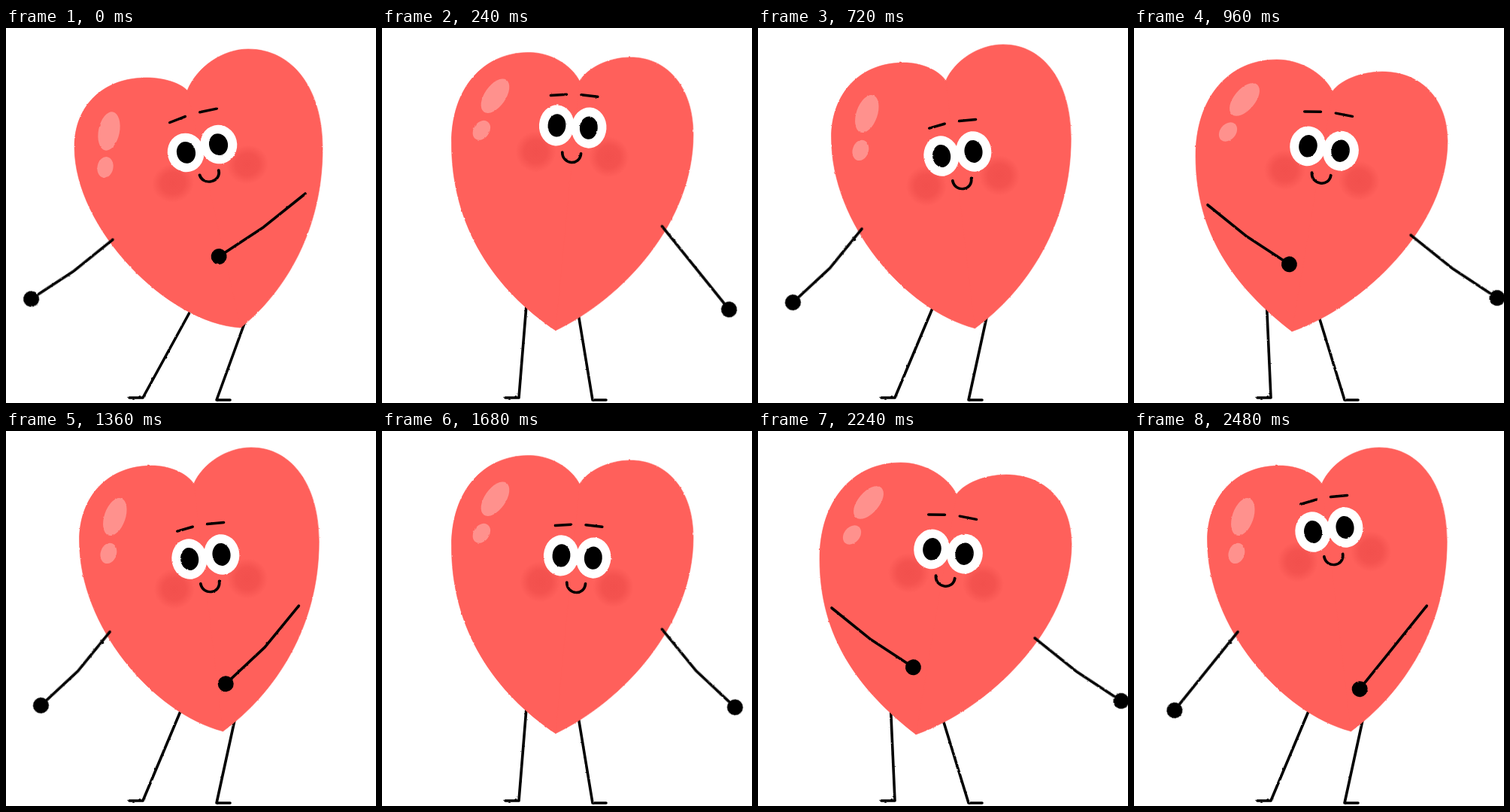
An HTML page that plays this animation: 492 by 498 pixels, repeating every 2560 ms.

```html
<!DOCTYPE html>
<html lang="en">
<head>
<meta charset="utf-8">
<title>Dancing heart</title>
<style>
  html, body { margin: 0; width: 100%; height: 100%; overflow: hidden; background: #fff; }
  svg { display: block; width: 100vw; height: 100vh; }
  .line { fill: none; stroke: #000; stroke-width: 3.6; stroke-linecap: round; stroke-linejoin: round; }
</style>
</head>
<body>
<svg viewBox="0 0 492 498">
  <defs>
    <radialGradient id="blush">
      <stop offset="0" stop-color="#f2504d"/>
      <stop offset=".55" stop-color="#f2504d" stop-opacity=".85"/>
      <stop offset="1" stop-color="#f2504d" stop-opacity="0"/>
    </radialGradient>
    <filter id="brush" filterUnits="userSpaceOnUse" x="0" y="0" width="492" height="498" color-interpolation-filters="sRGB">
      <feTurbulence type="fractalNoise" baseFrequency=".25" numOctaves="1" seed="4"/>
      <feDisplacementMap in="SourceGraphic" scale="2.2" xChannelSelector="R" yChannelSelector="G"/>
    </filter>
  </defs>
  <g id="stage" filter="url(#brush)"></g>
</svg>
<script>
const STEP = 80, SWAY = 8, CYCLE = 16;
const RED = '#ff605b', SHINE = '#ff918d';
const stage = document.getElementById('stage');

// Three key poses; every other pose is a blend of two of them
const upright = {
  notch: [261, 53], tip: [258, 400],
  left: { top: [203, 20], side: [106, 130], handle: [170, 351], shoulder: [133, 248] },
  right: { top: [331, 14], side: [410, 130], handle: [340, 345], shoulder: [378, 248] },
  bigShine: [155, 84], smallShine: [142, 133]
};
const leanLeft = {
  notch: [241, 83], tip: [312, 398],
  left: { top: [187, 66], side: [91, 158], handle: [214, 392], shoulder: [142, 281] },
  right: { top: [322, 28], side: [421, 160], handle: [372, 350], shoulder: [398, 220] },
  bigShine: [137, 137], smallShine: [132, 185]
};
const leanRight = {
  notch: [264, 84], tip: [210, 403],
  left: { top: [190, 42], side: [82, 170], handle: [135, 345], shoulder: [98, 235] },
  right: { top: [330, 58], side: [417, 150], handle: [305, 370], shoulder: [368, 275] },
  bigShine: [147, 95], smallShine: [125, 138]
};

function blend(a, b, t) {
  if (typeof a === 'number') return a + (b - a) * t;
  if (Array.isArray(a)) return a.map((v, i) => blend(v, b[i], t));
  return Object.fromEntries(Object.keys(a).map(k => [k, blend(a[k], b[k], t)]));
}

const line = pts => `<polyline class="line" points="${pts}"/>`;
const ellipse = (x, y, rx, ry, fill, turn = 0) =>
  `<ellipse cx="${x}" cy="${y}" rx="${rx}" ry="${ry}" fill="${fill}" transform="rotate(${turn} ${x} ${y})"/>`;

// Half of the heart, from the notch over the lobe and down to the tip
function half([nx, ny], [tipX, tipY], { top: [topX, topY], side: [sideX, sideY], handle }) {
  const dx = topX - nx, dy = topY - ny, k = 0.4;
  return `M${nx},${ny}` +
    `C${nx + .16 * dx},${ny + .57 * dy} ${topX - .42 * dx},${topY} ${topX},${topY}` +
    `C${sideX + (topX - sideX) * k},${topY} ${sideX},${topY + (sideY - topY) * k} ${sideX},${sideY}` +
    `C${sideX},${sideY + (tipY - sideY) * .45} ${handle} ${tipX},${tipY}L${nx},${ny}Z`;
}

const heart = ({ notch, tip, left, right }) =>
  `<path d="${half(notch, tip, left) + half(notch, tip, right)}" fill="${RED}" stroke="${RED}" stroke-width=".6"/>`;

const legs = (tipX, lean) =>
  line([164, 491, 182, 491, tipX - 46 + 1.3 * lean, 368]) +
  line([298, 494, 280, 494, tipX + 24 + 1.2 * lean, 382]);

const shines = (pose, lean) =>
  ellipse(...pose.bigShine, 14, 26, SHINE, 28 + 1.3 * lean) +
  ellipse(...pose.smallShine, 10.5, 14, SHINE, 28 + 1.3 * lean);

// A hanging arm swung about the shoulder; the elbow trails behind
function arm([x, y], length, th) {
  const swing = 56 * Math.cos(th) - 2 * Math.cos(3 * th) + 3 * Math.sin(th);
  const bend = 3.3 * (Math.cos(th) + Math.sin(th));
  return `<g transform="translate(${x} ${y}) rotate(${swing})">` +
    line([0, 0, bend, length / 2, 0, length]) + ellipse(0, length, 10.5, 10.5, '#000') + '</g>';
}

// The face bobs twice per sway, and the brows lift at the ends and the middle
function face(th, lean) {
  const c2 = Math.cos(2 * th), s2 = Math.sin(2 * th), a = Math.abs(lean);
  const x = 259.5 + 4 * Math.cos(th) - 2.5 * c2 + 3 * s2;
  const y = 149 + 11 * c2 + 18 * s2;
  const brow = -45 - 3.5 * Math.cos(4 * th);
  const pair = (draw, gap) => draw(-gap) + draw(gap);
  return `<g transform="translate(${x} ${y}) rotate(${lean - 1.3}) scale(${1 + .0065 * a} ${1 - .006 * a})">` +
    pair(cx => ellipse(cx + 2, 38, 26, 28, 'url(#blush)'), 47) +
    pair(cx => ellipse(cx, 0, 22.5, 28, '#fff'), 20.8) +
    pair(cx => ellipse(cx, 0, 11.5, 15.7, '#000'), 20.5) +
    line([-31, brow + 1, -11, brow - 2]) + line([8, brow - 3, 29, brow - 2]) +
    '<path class="line" d="M-11,36C-10,53.5 13,53.5 13,36"/></g>';
}

function draw(step) {
  const th = step / SWAY * 2 * Math.PI;
  const sway = .9 * Math.cos(th) + .1 * Math.cos(3 * th);
  const pose = blend(upright, sway > 0 ? leanLeft : leanRight, Math.abs(sway));
  const { notch, tip } = pose;
  const lean = Math.atan2(notch[0] - tip[0], tip[1] - notch[1]) * 180 / Math.PI;

  // Each arm passes behind the body on every second swing
  const leftBack = step >= 2 && step < 6, rightBack = step >= 6 && step < 10;
  const left = arm(pose.left.shoulder, 134, th), right = arm(pose.right.shoulder, 142, th);
  stage.innerHTML = (leftBack ? left : '') + (rightBack ? right : '') +
    legs(tip[0], lean) + heart(pose) + shines(pose, lean) + face(th, lean) +
    (leftBack ? '' : left) + (rightBack ? '' : right);
}

let start, shown = 0;
function tick(now) {
  start ??= now;
  const step = Math.floor((now - start) / STEP) % CYCLE;
  if (step !== shown) draw(shown = step);
  requestAnimationFrame(tick);
}
draw(0);
requestAnimationFrame(tick);
</script>
</body>
</html>
```
